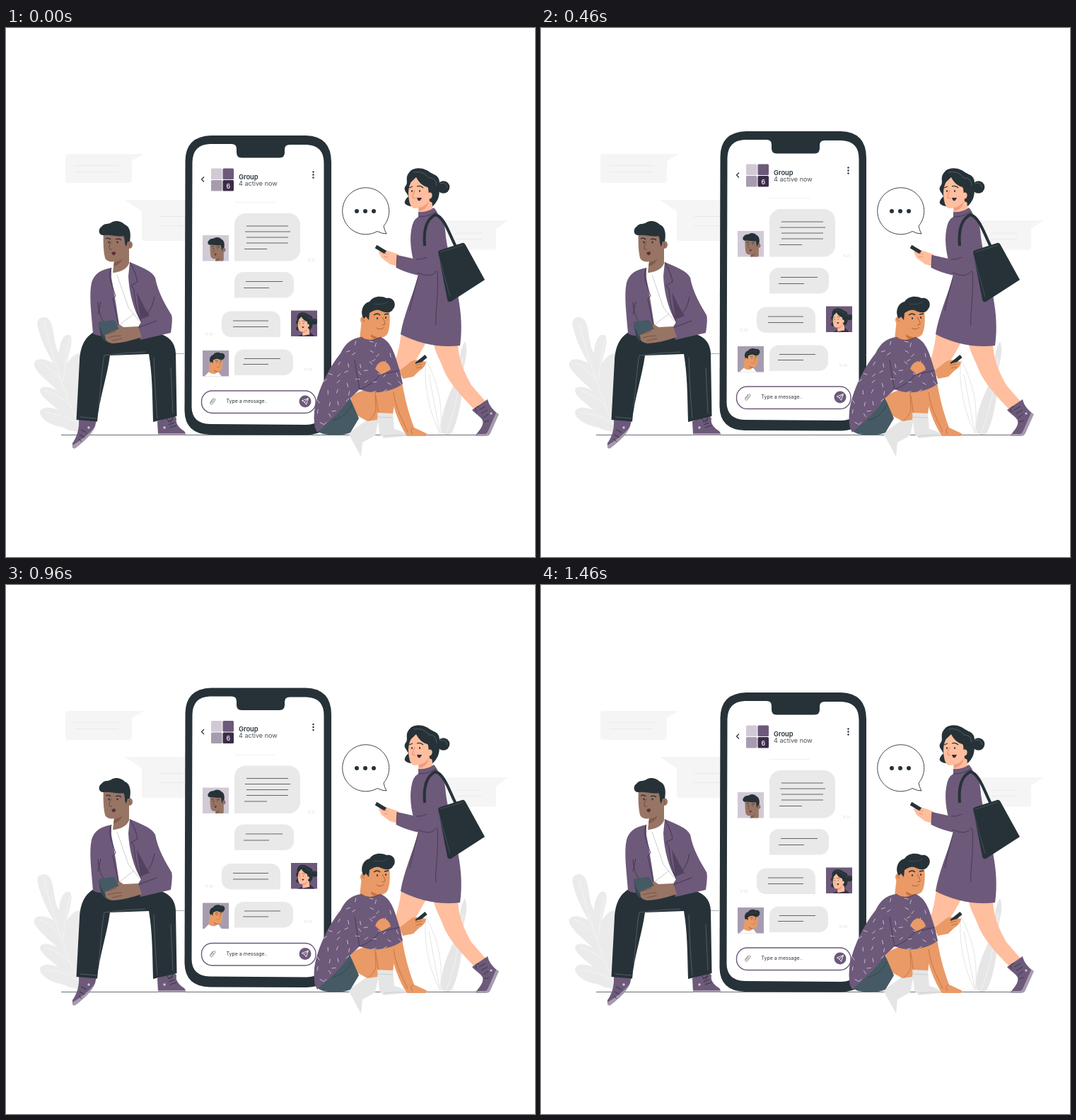
Recreate the animation shown at these times as an HTML page with a canvas. Size 748 by 748 pixels, loop 1.5 s.

```html
<!DOCTYPE html>
<html lang="en">
<head>
<meta charset="utf-8">
<title>Group chat</title>
<style>
  html, body { margin: 0; width: 100%; height: 100%; overflow: hidden; background: #fff; }
  canvas { display: block; width: 748px; height: 748px; }
</style>
</head>
<body>
<canvas id="stage"></canvas>
<script>
const SIZE = 748, LOOP = 1500, STEPS = 36, LIFT = 9.5;
const DARK = '#263238', PURPLE = '#6d597a', DEEP = '#3b2c48', MID = '#a79caf', PALE = '#d1cad6';
const BROWN = '#987464', TAN = '#e99a67', PEACH = '#ffbe9d', TEAL = '#455a64', GREY = '#e9e9e9';
const FONT = 'Inter, Roboto, sans-serif';

const canvas = document.getElementById('stage');
const ctx = canvas.getContext('2d');
const ratio = window.devicePixelRatio || 1;
canvas.width = canvas.height = SIZE * ratio;

function fill(color, d) {
  ctx.fillStyle = color;
  ctx.fill(new Path2D(d));
}

function line(color, width, d) {
  ctx.strokeStyle = color;
  ctx.lineWidth = width;
  ctx.stroke(new Path2D(d));
}

function dot(color, x, y, rx, ry = rx, turn = 0) {
  ctx.fillStyle = color;
  ctx.beginPath();
  ctx.ellipse(x, y, rx, ry, turn, 0, Math.PI * 2);
  ctx.fill();
}

function box(color, x, y, w, h, radii = 0) {
  ctx.fillStyle = color;
  ctx.beginPath();
  ctx.roundRect(x, y, w, h, radii);
  ctx.fill();
}

function text(str, x, y, size, color, weight = 400) {
  ctx.font = `${weight} ${size}px ${FONT}`;
  ctx.fillStyle = color;
  ctx.fillText(str, x, y);
}

function drawBackground() {
  fill('#f5f5f5', 'M88 178H195L178 188V214Q178 219 173 219H88Q84 219 84 214V182Q84 178 88 178Z');
  fill('#f5f5f5', 'M168 243H300V301H196Q192 301 192 297V259Z');
  fill('#f5f5f5', 'M600 272H710L693 284V309Q693 313.500 689 313.500H600Z');
  line('#e6e6e6', .8, 'M97 194.500H159M97 203.500H159M216 266.500H260M216 279.500H260M636 290H673M636 298.500H673');

  fill('#ebebeb', `M44.500 419C43 408 57 405 63 415C69 428 67 448 75 460C75 448 81 430 90 434
    C97 440 88 463 86 474C95 462 103 456 108 464L110 571C98 571 88 569 82 565C62 562 49 552 48 544
    C48 535 62 535 74 540C62 530 48 520 48 512C50 504 66 508 73 513C60 500 37 483 40 473
    C45 464 60 470 67 474C56 455 47 435 44.500 419Z`);
  line('#f7f7f7', .8, 'M54 417C65 460 78 505 103 562M47 473Q65 480 78 498M90 440Q84 465 81 500M55 512Q75 518 90 533M56 544Q80 546 98 557');

  fill('#e6e6e6', 'M649 443C655 458 647 475 646 490C647 520 638 560 630 573Q623 578 616 572C612 552 625 520 637 496C643 480 639 458 649 443Z');
  line('#f5f5f5', .8, 'M646 465C642 505 633 550 622 573');
  line('#dedede', .8, 'M594 470C590 495 596 540 614 573C617 545 616 510 594 470M598 490L613 570');
  line(DARK, .7, 'M78 575.500H683');
  line('#777', .6, 'M232 460.500H252');
}

function drawManHead() {
  fill(BROWN, 'M150 317L174 305L174 333C171 341 160 346 151 346L153 329Z');
  fill('#805c4e', 'M153 331Q161 330 165 325Q162 335 152 337Z');
  fill(BROWN, 'M138 288C137 304 138 317 140 325C143 333 157 331 163 327C170 322 174 312 174 300L170 284Z');
  dot(BROWN, 174, 306.500, 5, 5.500);
  fill(DARK, `M139 293C130 294 130 284 135 281C139 275 146 278 149 275C156 271 164 274 168 278
    C176 281 177 292 175 302L172 302L170 309C167 306 169 298 166 294C158 296 147 292 139 293Z`);
  line(DARK, 1.3, 'M141 298Q145 296 148 299M155 299Q160 297 163 300');
  dot(DARK, 145.500, 303, 1.1, 1.4);
  dot(DARK, 157.500, 303, 1.1, 1.4);
  line('#5d3f36', .8, 'M149 302Q145 310 146 312Q148 314 150 313');
  fill('#5a3038', 'M149 318Q152 315 155 317Q155 322 151 321Z');
  line('#5d3f36', .6, 'M173 304Q177 306 174 310');
}

function drawLeftMan() {
  fill('#6d597a', 'M103 552L128 554L126 563C121 576 107 587 98 594Q93 596 94 587C100 579 104 567 103 552Z');
  fill(MID, 'M126 563C121 576 107 587 98 594Q94 596 94 590C108 582 119 573 126 563Z');
  fill(PURPLE, 'M214 556L237 547L241 552C239 560 246 566 252 570Q255 574 253 575H215Z');
  fill(MID, 'M215 573H253L253 575.500H215Z');
  line(DARK, .9, 'M106 568L114 572M104 575L111 579M103 581L107 585M229 557L236 553M230 561L238 558M232 565L241 562M230 556Q223 549 232 549Q239 550 232 558');
  dot(PALE, 117, 565, 1.7);
  dot(PALE, 224, 565, 1.7);

  fill(DARK, `M124 430C109 439 105 454 104 470L99.500 554L129 556.500C131 528 143 493 147 463
    L202 461C207 490 207 520 208 557L241.500 549L240 460C239 444 230 435 213 431L180 424L140 428Z`);
  line('#71797d', .6, 'M131 535C134 510 136 475 139 463Q168 459 197 458M214 552C211 520 210 490 209 466M233 480L236 545M105 550L128 552');

  fill('#fff', 'M148 342L175 332L178 395L191 418L184 430H154Z');
  drawManHead();
  fill(PURPLE, `M149 339C134 342 125 347 121 360C117 378 121 405 123 432C130 437 139 435 148 434
    L161 428C158 405 154 380 149 353Z`);
  fill(PURPLE, `M175 331C191 338 206 343 211 353C215 375 226 392 234 406Q236 411 233 431
    L190 441L186 424L191 416C181 400 174 375 173 351Z`);
  line(DEEP, .8, `M149 339C145 347 147 353 148 358L155 379L151 383L160 424M175 331C180 340 185 351 186 359L177 364L181 369
    C182 390 187 405 191 416M210 380C207 395 202 404 192 411M186 424L213 414M130 388C132 410 138 415 143 421M134 387L130 405`);
  fill('#534160', 'M185 374L197 397L203 407L190 412Z');
  line('#999', .5, 'M157 349L173 395L188 414M160 420L181 404');
  fill(BROWN, 'M149 427L160 419L166 423L187 422L192 437C178 442 160 446 150 446Q140 444 139 437Z');
  fill(TEAL, 'M131 419Q130 415 134 415L151 413Q154 413 155 416L160 426L142 439Q139 438 138 435Z');
  fill('#37474f', 'M131 419L138 435L142 439L140 443Q136 440 134 434Z');
  fill(BROWN, 'M140 434Q150 429 158 426Q164 424 160 430L153 435L164 435Q166 439 158 440Q148 446 141 441Z');
  line('#5d3f36', .6, 'M142 433Q150 431 156 428M144 438Q153 435 163 435M150 442L164 439');
}

function drawWomanHead() {
  dot(DARK, 618.500, 225, 8.800);
  fill(DARK, `M569 238C561 246 562 250 572 252L596 257C610 250 615 236 612 224C616 212 607 206 602 207
    C594 197 579 196 572 202C563 211 569 216 566 222C560 229 567 232 569 238Z`);
  fill(PEACH, 'M583 239L601 232L604 263L583 267Z');
  fill(PEACH, `M573 217C569 225 568 233 570 244C572 254 576 257 583 254C594 252 601 244 600 226
    C588 224 583 217 580 211Z`);
  fill('#f19b83', 'M584 254Q594 252 598 244Q596 257 584 259Z');
  fill(DARK, `M571 219C577 216 580 207 584 207C585 219 595 220 597 227L599 245
    C606 250 613 244 612 230L611 213C603 203 590 199 577 204Z`);
  dot(PEACH, 599, 237, 3.600, 4.600, .2);
  line(DARK, 1.100, 'M570 226L575 224M581 224Q586 222 590 226');
  dot(DARK, 574, 230.500, 1, 1.500);
  dot(DARK, 585, 230.500, 1, 1.500);
  line('#e1775d', .8, 'M578 229Q574 239 575 240L579 241');
  fill(DEEP, 'M581 240L588 240Q585 247 582 243Z');
  line('#78838a', .5, 'M576 204Q590 201 598 212Q608 211 609 223M613 220Q622 217 624 226');
}

function drawWoman() {
  fill(PEACH, 'M559 428L598 436C591 452 578 473 564 493L545 490C550 470 557 455 559 428Z');
  fill(PEACH, `M604 442H639C639 470 649 488 658 505L678 528L662 539C645 522 625 500 618 481C613 467 606 458 604 442Z`);
  fill(PURPLE, `M659 540L681 525C683 535 691 542 696 546L684 571Q682 576 678 576H664
    C668 570 676 563 674 555C672 550 663 545 659 540Z`);
  fill(MID, 'M693 544L697 546L685 573Q683 577 678 577H664L667 574H677Q680 574 682 569Z');
  line(DARK, .8, 'M669 540L678 535M672 545L681 540M675 551L682 546M676 557L683 555M666 543Q660 536 669 535');
  dot(PALE, 686, 545, 1.6);

  drawWomanHead();
  fill(PURPLE, `M583 260Q596 261 605 254Q610 260 611 264C619 269 621 282 622 296C626 325 637 360 641 390
    C645 415 644 435 642 449C615 453 582 446 558 433C562 407 575 378 583 350C574 327 570 304 573 286Q575 271 583 267Z`);
  line(DEEP, .7, 'M583 267Q598 267 608 260M594 286C588 305 591 320 592 330M583 350Q575 379 571 400M610 344C612 380 606 410 608 420');
  fill(PEACH, 'M555 320L537 314Q530 312 527 317L531 325L543 334L554 337Z');
  line(DARK, 5, 'M523 309L537 317.500');
  fill(PEACH, 'M533 323L538 315L545 318L541 326Z');
  line('#e1775d', .6, 'M534 318L540 320M534 323L540 324');
  fill(PURPLE, `M553 321L580 327C585 318 582 290 589 278C596 267 611 269 615 284C616 310 615 340 606 349
    C596 355 570 348 552 339Z`);
  line(DEEP, .7, 'M580 327Q588 328 595 324M553 321L552 339M582 346Q602 355 609 343');
  line(DARK, 4, 'M592 308C590 286 595 270 607 264C620 267 627 292 636 309');
  fill(DARK, 'M611 317Q611 315 614 314L645 304Q648 303 650 307L677 356L629 387Q625 388 624 384Z');
  line('#58646a', .6, 'M614 317L646 307M612 323L628 380');
}

function drawSittingHead() {
  fill(TAN, 'M503 412L526 423L527 440Q518 451 500 440Z');
  fill('#c5723f', 'M517 432Q523 437 531 438Q523 444 516 436Z');
  fill(TAN, 'M507 403L541 394C544 409 543 426 539 433C533 442 517 437 511 427C507 421 505 412 507 403Z');
  dot(TAN, 505.500, 413, 4.500, 5.500);
  fill(DARK, `M506 411C500 403 504 389 514 387C519 379 530 378 538 382C549 380 553 392 547 398
    C543 405 534 402 528 399C521 398 518 401 514 403L513 413L509 408Z`);
  line(DARK, 1.3, 'M520 406Q525 402 529 406M535 405L541 404');
  dot(DARK, 525, 410.500, 1, 1.5);
  dot(DARK, 537, 409.500, 1, 1.5);
  line('#a35328', .8, 'M532 409Q537 417 536 419L532 420M524 424Q530 428 535 423M503 411L507 415');
  line('#5b666b', .5, 'M520 390Q534 392 540 387');
}

const SWEATER = `M502 437C488 439 480 446 473 460C457 480 440 512 436 542Q434 562 440 572
  C459 555 475 541 487 523L500 511C520 519 545 515 561 503L557 485C550 463 546 444 530 437Q512 446 502 437Z`;

function drawKnit() {
  ctx.save();
  ctx.clip(new Path2D(SWEATER));
  let seed = 11;
  const random = () => (seed = seed * 16807 % 2147483647) / 2147483647;
  for (let i = 0; i < 78; i++) {
    const x = 438 + i % 9 * 14 + random() * 7, y = 440 + Math.floor(i / 9) * 14 + random() * 7;
    const turn = random() * Math.PI;
    line(PALE, .9, `M${x} ${y}l${6 * Math.cos(turn)} ${6 * Math.sin(turn)}`);
  }
  ctx.restore();
}

function drawSittingMan() {
  fill('#e5e5e5', 'M484 573L511 554L527 553L522 576L504 586L502 606Z');
  fill(TAN, 'M544 505L560 501C565 530 571 549 577 565L594 573Q598 576 593 577H567C556 561 548 537 544 520Z');
  fill(TAN, `M487 522C501 510 515 511 520 514L522 480C532 466 547 472 549 488C551 510 549 530 547 548
    L526 549L525 554L511 556L493 546Z`);
  line('#b96535', .7, 'M522 516L523 541Q520 550 513 555M548 515C551 538 560 553 568 571M527 548L523 520M575 574Q570 568 576 565');
  fill('#e5e5e5', 'M525 544L547 545L549 567C557 569 566 572 566 577L534 580L528 574Z');
  line('#bbb', .6, 'M526 550L547 551M534 577Q550 575 565 576');
  fill(TEAL, 'M436 563C449 552 473 537 486 522L499 552L487 572Q477 577 455 575Q440 574 436 563Z');
  line('#2d4048', .7, 'M462 555Q482 550 489 532');
  drawSittingHead();
  fill(PURPLE, SWEATER);
  drawKnit();
  fill(TAN, 'M522 482Q525 473 533 471Q542 473 544 483L531 490Z');
  line(DEEP, .7, 'M493 469Q496 490 500 511M500 511Q520 503 528 491L556 484M502 437Q514 446 530 437');
  fill(TAN, 'M557 484L570 474Q576 468 583 470L594 472Q593 480 584 485L576 493L561 496Z');
  line(DARK, 5, 'M580 475.500L594 464');
  fill(TAN, 'M575 477Q582 473 589 472L590 476L580 482Z');
  line('#a35328', .6, 'M579 477L588 475M580 481L588 479');
}

function drawAvatar(x, y, color, scale, dx, dy, head, shoulders) {
  ctx.save();
  box(color, x, y, 37, 36.500);
  ctx.beginPath();
  ctx.rect(x, y, 37, 36.500);
  ctx.clip();
  ctx.translate(dx, dy);
  ctx.scale(scale, scale);
  if (shoulders) fill(...shoulders);
  head();
  ctx.restore();
}

function drawScreen() {
  line(DARK, 1.200, 'M280 210.500L276.500 214L280 217.500');
  [PALE, PURPLE, MID, DEEP].forEach((color, i) =>
    box(color, 290 + i % 2 * 16.500, 198.500 + (i >> 1) * 16.500, 15.500, 15.500, 1.5));
  text('6', 311.500, 226.500, 9, '#fff', 500);
  text('Group', 329, 213.500, 9.300, DARK, 600);
  text('4 active now', 329, 223, 9.100, '#4a4f57');
  for (let i = 0; i < 3; i++) dot(DARK, 434.500, 203.500 + i * 4, 1.200);
  line('#ececec', .8, 'M323 246.500H380');

  box(GREY, 323, 262, 93, 67.500, [16, 16, 16, 0]);
  box(GREY, 323, 345, 84, 36.500, [13, 13, 13, 0]);
  box(GREY, 305, 400.500, 83, 36.500, [13, 13, 0, 13]);
  box(GREY, 323, 454.500, 83, 36.500, [13, 13, 13, 0]);
  line('#555', .9, `M340 280H399M338 288H402M340 296H399M340 304H399M337 312.500H369
    M339 358.500H391M336 367.500H372M321 414H371M321 422.500H371M337 467.500H388M335 475.500H371`);
  text('11:25', 426, 330, 5, '#dcdcdc');
  text('11:30', 281, 434.500, 5, '#dcdcdc');
  text('11:45', 421.500, 484.500, 5, '#dcdcdc');

  drawAvatar(278, 293, PALE, .53, 215.600, 151.300, drawManHead);
  drawAvatar(403, 399.500, PURPLE, .48, 139.500, 307, drawWomanHead, [DEEP, 'M555 275L583 262L605 256L625 275Z']);
  drawAvatar(278, 456, MID, .46, 56.500, 284.200, drawSittingHead, ['#fff', 'M480 460L500 440H530L545 460Z']);

  ctx.strokeStyle = PURPLE;
  ctx.lineWidth = 1.4;
  ctx.beginPath();
  ctx.roundRect(276.500, 513, 161.500, 31.500, 15);
  ctx.stroke();
  line('#777', .8, 'M289 530L293.500 524.500Q296 523 296 526L291.500 532Q288 533 289 529L293 524M291 530L294 526.500');
  text('Type a message..', 311.500, 530.300, 7, '#333');
  dot(PURPLE, 423, 528, 8.500);
  line('#fff', .9, 'M418.500 527L427.500 523.500L424.500 532.500L422 529ZM422 529L427.500 523.500');
}

function drawPhone() {
  fill(DARK, `M290 152H424Q460 153 460 190V542Q459 575 425 575.500L288 575Q253 574 252.500 541L253.500 188Q254 153 290 152Z`);
  fill('#fff', `M288 164H319Q326 164 326 171V176Q326 183.500 333 183.500H387Q394 183.500 394 176V172Q394 165 401 165H425
    Q449.500 166 449.500 191V536Q449 560.500 425 561L288 560Q263 559 262.500 536L263.500 190Q264 165 288 164Z`);
  drawScreen();
}

function drawSpeech() {
  const outline = 'M534 280A33 33 0 1 0 525 287.500Q532 291 538 291Q535 286 534 280Z';
  fill('#fff', outline);
  line(DARK, .9, outline);
  for (let i = 0; i < 3; i++) dot(DARK, 496 + i * 12, 259, 3);
}

function render(now) {
  const step = Math.floor((now % LOOP + 5) / (LOOP / STEPS)) % STEPS;
  const lift = LIFT * (1 - Math.abs(2 * step / (STEPS - 1) - 1));
  ctx.setTransform(ratio, 0, 0, ratio, 0, 0);
  ctx.fillStyle = '#fff';
  ctx.fillRect(0, 0, SIZE, SIZE);
  drawBackground();
  ctx.save();
  ctx.translate(0, -lift);
  drawPhone();
  ctx.restore();
  drawLeftMan();
  drawSpeech();
  drawWoman();
  drawSittingMan();
}

let start;
function tick(now) {
  start ??= now;
  render(now - start);
  requestAnimationFrame(tick);
}
render(0);
requestAnimationFrame(tick);
</script>
</body>
</html>
```
